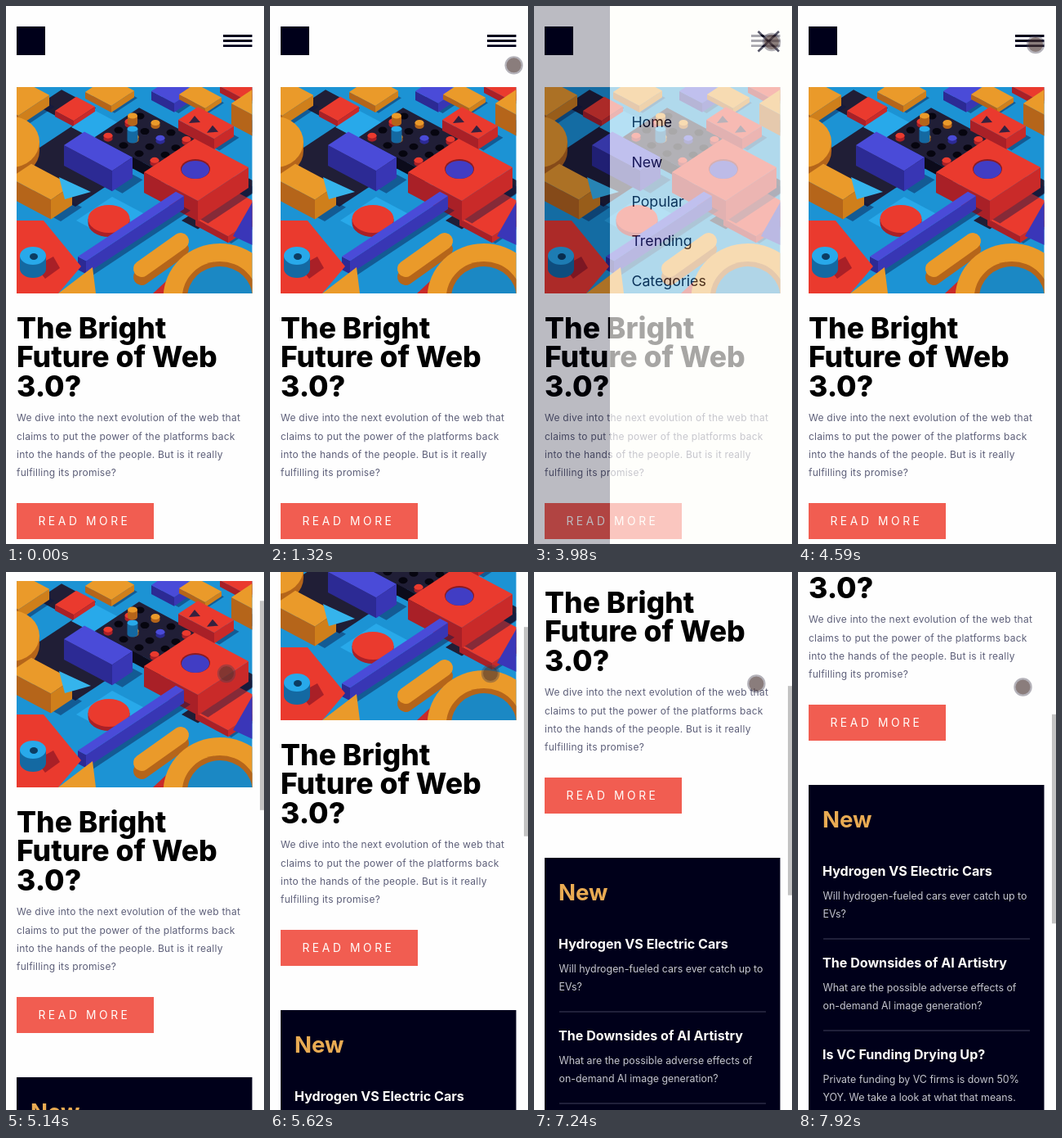
An HTML page for the animation above (7990 ms loop, 316x657 px).

```html
<!DOCTYPE html>
<html lang="en">
<head>
<meta charset="utf-8">
<title>News page on a phone</title>
<style>
  html, body { margin: 0; width: 100%; height: 100%; overflow: hidden; background: #fefefe; }
  #stage { display: block; width: 100%; height: 100%; }
  text { font-family: Inter, "Open Sans", sans-serif; white-space: pre; }
  .title { font-size: 35.56px; font-weight: 800; fill: #000; }
  .body { font-size: 12px; letter-spacing: .24px; fill: #5d5f79; }
  .button { font-size: 13.8px; letter-spacing: 3.6px; fill: #fffdfa; }
  .new { font-size: 27.6px; font-weight: 700; fill: #e9ab53; }
  .head { font-size: 16.1px; font-weight: 700; fill: #fffdfa; }
  .note { font-size: 12.4px; fill: #c5c6ce; }
  .link { font-size: 17.8px; fill: #00001a; }
</style>
</head>
<body>
<svg id="stage" viewBox="0 0 316 657">
  <g id="page">
    <rect x="13" y="25" width="35" height="35" fill="#00001a"/>
    <path d="M266 36.5h35.5M266 42.5h35.5M266 48.7h35.5" stroke="#00001a" stroke-width="2.8"/>
    <svg id="art" x="13" y="99" width="288.5" height="252" viewBox="13 99 288.5 252"></svg>
    <rect x="13" y="607" width="168" height="44" fill="#f15d51"/>
    <rect x="13" y="705" width="288.5" height="420" fill="#00001a"/>
    <path d="M31 893h253M31 1005h253" stroke="#40415a" stroke-width="1.2"/>
    <g id="copy"></g>
  </g>
  <rect id="thumb" x="311" width="5" height="255.5" fill="#c3c3c3"/>
  <g id="menu">
    <rect width="316" height="657" fill="#00001a" opacity=".4"/>
    <rect x="93" width="223" height="657" fill="#fffefa"/>
    <path d="M274.5 31L300 55.5M300 31L274.5 55.5" stroke="#00001a" stroke-width="2.7"/>
    <g id="links"></g>
  </g>
  <g id="cursor">
    <circle r="11.2" fill="#474252" fill-opacity=".4"/>
    <circle r="9" fill="#4a2c20" fill-opacity=".4"/>
  </g>
</svg>
<script>
const LOOP = 7990;
const $ = id => document.getElementById(id);

// ---- text ----
const lines = (cls, x, y, gap, rows) =>
  rows.map((s, i) => `<text class="${cls}" x="${x}" y="${y + i * gap}">${s}</text>`).join("");

const stories = [
  ["Hydrogen VS Electric Cars", "Will hydrogen-fueled cars ever catch up to", "EVs?"],
  ["The Downsides of AI Artistry", "What are the possible adverse effects of", "on-demand AI image generation?"],
  ["Is VC Funding Drying Up?", "Private funding by VC firms is down 50%", "YOY. We take a look at what that means."]
];

$("copy").innerHTML =
  lines("title", 13, 405.5, 35.56, ["The Bright", "Future of Web", "3.0?"]) +
  lines("body", 13, 507.3, 22.25, [
    "We dive into the next evolution of the web that",
    "claims to put the power of the platforms back",
    "into the hands of the people. But is it really",
    "fulfilling its promise?"]) +
  lines("button", 39.4, 633.7, 0, ["READ MORE"]) +
  lines("new", 30, 757, 0, ["New"]) +
  stories.map(([head, ...note], i) =>
    lines("head", 30, 816.4 + i * 112, 0, [head]) +
    lines("note", 30.5, 844.5 + i * 112, 22.3, note)).join("");

$("links").innerHTML =
  lines("link", 119.4, 148.3, 48.3, ["Home", "New", "Popular", "Trending", "Categories"]);

// ---- picture of toy blocks: colour = [top, left side, right side] ----
const ink = {
  o: ["#ea9a2a", "#b5651a", "#cf7f1b"],
  r: ["#ea3a2e", "#a92027", "#c92a29"],
  p: ["#4a4bd8", "#2c2a94", "#3836b4"],
  c: ["#28a9ea", "#1469a2", "#1b88c4"],
  n: ["#201e36", "#0c0b1b", "#141327"]
};
const flat = (pts, fill, extra = "") => `<polygon points="${pts.join(" ")}" fill="${fill}" ${extra}/>`;
const oval = (x, y, rx, ry, fill) => `<ellipse cx="${x}" cy="${y}" rx="${rx}" ry="${ry}" fill="${fill}"/>`;

// A point a steps up-right and b steps down-right of (x, y).
const iso = (x, y, a, b) => [x + a + b, y - .66 * a + .53 * b];
const shift = ([x, y], dx, dy) => [x + dx, y + dy];

// Box seen from above, placed by the left corner of its top.
function box(x, y, a, b, h, key) {
  const top = [iso(x, y, 0, 0), iso(x, y, a, 0), iso(x, y, a, b), iso(x, y, 0, b)];
  const side = (p, q, fill) => flat([p, q, shift(q, 0, h), shift(p, 0, h)], fill);
  const [left, , right, near] = top;
  return flat(top.map(p => shift(p, h * .5, h * 1.1)), "#0a1746", `opacity="${h ? .45 : 0}"`) +
    side(left, near, ink[key][1]) + side(near, right, ink[key][2]) + flat(top, ink[key][0]);
}

function drum(x, y, rx, ry, h, key) {
  const [top, side] = ink[key];
  return `<path d="M${x - rx} ${y}v${h}a${rx} ${ry} 0 0 0 ${2 * rx} 0v${-h}z" fill="${side}"/>` +
    oval(x, y, rx, ry, top);
}

// Rows of holes, some filled with pegs in turn.
function pegs(x, y) {
  let out = "";
  for (let i = 3; i >= 0; i--) for (let j = 0; j < 4; j++) {
    const [u, v] = iso(x, y, 7 + i * 13, 9 + j * 19);
    const n = i * 3 + j * 2;
    out += oval(u, v, 5.5, 4, "#06050f");
    if (n % 5 < 2) out += drum(u, v - 2, 5.5, 3.5, 4, "rpo"[n % 3]);
  }
  return out;
}

const bar = (y, c) =>
  `<path d="M166 ${y}l48 -34" stroke="${c}" stroke-width="20" stroke-linecap="round"/>`;

$("art").innerHTML = [
  `<rect x="13" y="99" width="289" height="252" fill="#1c93d4"/>`,
  box(38, 122, 30, 42, 0, "n"),
  box(0, 200, 85, 85, 0, "n"),
  box(-15, 118, 38, 30, 13, "o"),
  drum(6, 166, 35, 31, 11, "o"),
  box(60, 128, 26, 23, 7, "r"),
  box(80, 148, 30, 28, 0, "c"),
  box(97, 105, 28, 32, 8, "o"),
  box(178, 104, 24, 28, 11, "p"),
  box(212, 108, 20, 32, 6, "o"),
  box(262, 98, 20, 30, 8, "r"),
  box(276, 119, 28, 30, 26, "o"),

  box(109, 160, 54, 78, 14, "n"),
  pegs(109, 160),
  drum(155, 150, 6.5, 3.5, 14, "c"),
  drum(155, 134, 6, 3.5, 9, "o"),

  box(211, 139, 24, 44, 13, "r"),
  ...[0, 1].map(i => flat([iso(224, 143, 0, 22 * i), iso(231, 134, 0, 22 * i), iso(238, 142, 0, 22 * i)], "#35213f")),
  box(5, 210, 26, 50, 24, "o"),
  flat([[65, 209], [104, 227], [72, 236]], "#35b4ec"),
  box(71, 170, 25, 59, 25, "p"),

  box(86, 262, 44, 44, 0, "c"),
  drum(126, 260, 25.5, 17, 5, "r"),
  box(215, 262, 80, 20, 0, "n"),
  box(232, 260, 50, 40, 8, "r"),
  box(169, 203, 62, 66, 25, "r"),
  oval(232, 199, 18, 12, "#8b1a22"),
  oval(232, 200, 17, 11, "#413dc4"),
  flat([[278, 281], [302, 239], [302, 292]], "#3a36b8"),
  box(88, 306, 120, 10, 16, "p"),

  flat([[13, 262], [46, 262], [92, 318], [64, 351], [13, 351]], ink.r[0]),
  flat([[36, 318], [58, 306], [66, 320], [48, 333]], ink.r[1]),
  drum(33, 305, 16, 11, 16, "c"),
  oval(34, 306, 5, 4, "#0c3d63"),
  flat([[64, 351], [106, 319], [110, 351]], ink.o[0]),

  bar(331, ink.o[1]),
  bar(321, ink.o[0]),
  flat([[180, 351], [222, 312], [250, 300], [240, 351]], ink.r[2]),
  ...[[66, ink.o[0]], [44, ink.o[1]], [38, ink.c[2]]].map(([r, c]) => oval(262, 356, r * 1.05, r, c))
].join("");

// ---- motion ----
// Cursor moves: start, length, end place.
const moves = [
  [1110, 410, 291, 44], [4530, 60, 291, 47], [4600, 500, 270, 124],
  [5880, 480, 272, 136], [7170, 430, 275.5, 140.5]
];
const wheel = [4860, 5393, 6010, 6680, 7240];
const NOTCH = 89, GLIDE = 290, STEP = 69, ANCHOR = 4584;

const ramp = (t, start, length) => Math.min(1, Math.max(0, (t - start) / length));
const ease = u => u < .5 ? 2 * u * u : 1 - 2 * (1 - u) ** 2;
const snap = t => ANCHOR + 6 + Math.floor((t - ANCHOR) / STEP) * STEP;

function draw(time) {
  const t = snap(time);
  const scroll = NOTCH * wheel.reduce((s, start) => s + ease(ramp(t, start, GLIDE)), 0);
  const [x, y] = moves.reduce(([x, y], [start, length, u, v]) => {
    const f = ramp(t, start, length);
    return [x + (u - x) * f, y + (v - y) * f];
  }, [304, 92]);

  $("page").setAttribute("transform", `translate(0 ${-Math.floor(scroll)})`);
  $("thumb").setAttribute("y", scroll * .389 + .7);
  $("thumb").setAttribute("visibility", scroll > 0 ? "visible" : "hidden");
  $("menu").setAttribute("opacity", ramp(t, 2040, 200) - ramp(t, 3900, 200));
  $("cursor").setAttribute("visibility", time >= moves[0][0] ? "visible" : "hidden");
  $("cursor").setAttribute("transform", `translate(${x} ${y})`);
}

const start = performance.now();
function tick() {
  draw((performance.now() - start) % LOOP);
  requestAnimationFrame(tick);
}
tick();
</script>
</body>
</html>
```
